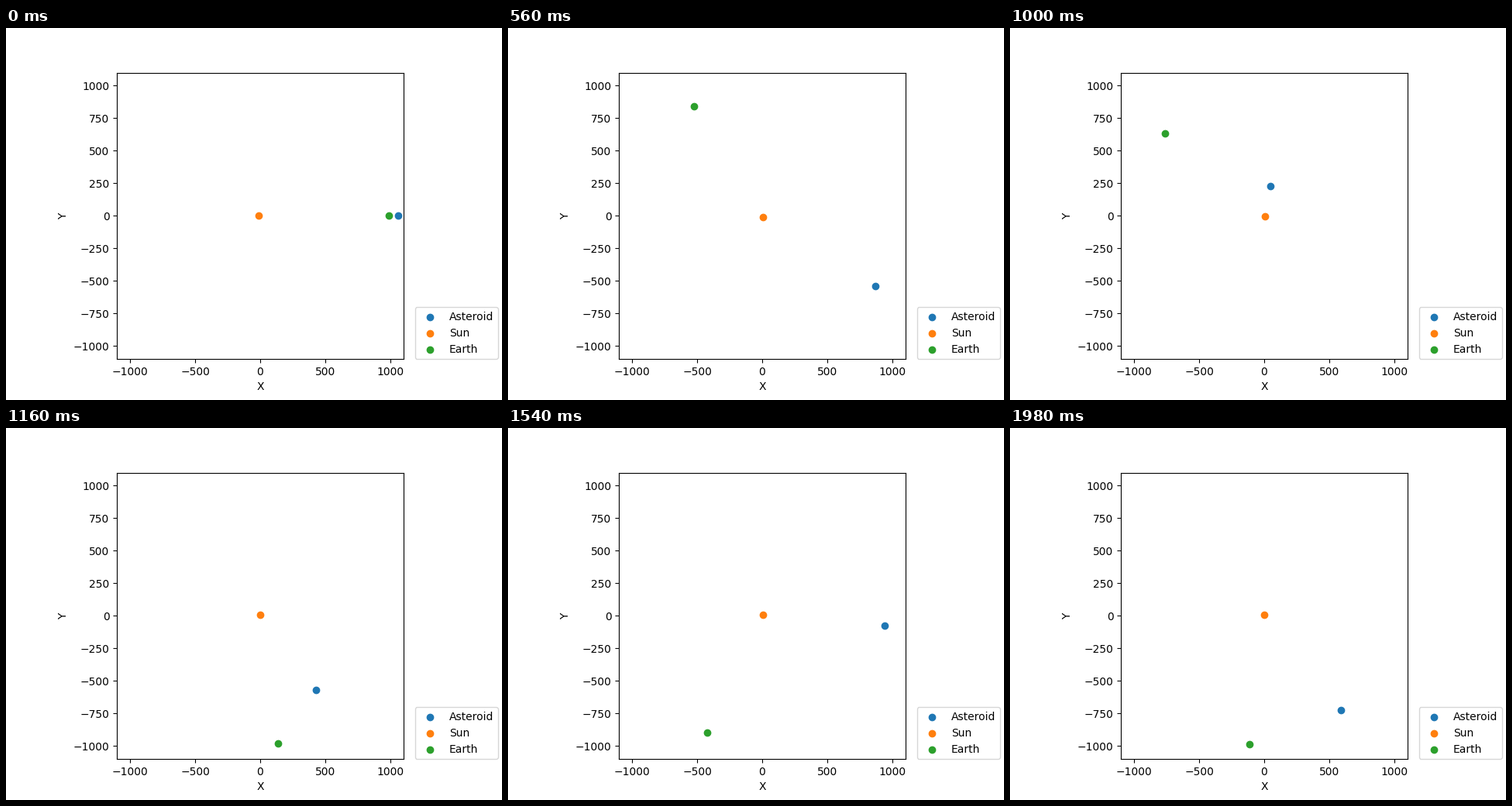
Write a matplotlib script that moves like this. It is 640 px wide and 480 px high and loops after 2 s.

```python
import math

import matplotlib.pyplot as plt
import numpy as np
from matplotlib.animation import FuncAnimation

FRAMES = 100
DT = 30 / 999 * 10      # model time per frame, the planet turns 1 rad per unit
MU = 0.01               # planet's share of the total mass
SCALE = 1000
START_STEPS, STEPS = 40, 6

# Waypoints of the asteroid: frame, x, y
WAYPOINTS = [(12, -.220, .199), (28, .899, -.557), (50, -.262, .121),
             (66, .899, -.504), (77, .821, .187), (99, .750, -.616)]
POS_TOL = 0.003

# Start values x, vx, vy and total GM, with their tolerances
GUESS = np.array([1.0, 0.0, 0.1, 0.1])
TOL = np.array([0.002, 0.01, 0.02, 0.004])


def cis(a):
    return complex(math.cos(a), math.sin(a))


# Fine time steps at first, while the asteroid leaves the planet
times = [DT * (i / START_STEPS) ** 2 for i in range(START_STEPS)]
times += [DT * (1 + i / STEPS) for i in range((FRAMES - 2) * STEPS + 1)]
legs = [(b - a, cis(a), cis((a + b) / 2), cis(b))
        for a, b in zip(times, times[1:])]


def step_of(frame):
    return START_STEPS + STEPS * (frame - 1) if frame else 0


def pull(z, e, gm):
    """Acceleration at z with the planet in direction e."""
    a = z + MU * e
    b = z - (1 - MU) * e
    return -gm * ((1 - MU) * a / abs(a) ** 3 + MU * b / abs(b) ** 3)


def orbit(q, last=FRAMES - 1):
    """Asteroid path by RK4 up to the given frame."""
    x, vx, vy, gm = (float(c) for c in GUESS + TOL * q)
    z, v = complex(x, 0), complex(vx, vy)
    path = [z]
    for h, e0, e1, e2 in legs[:step_of(last)]:
        a1 = pull(z, e0, gm)
        v2 = v + h / 2 * a1
        a2 = pull(z + h / 2 * v, e1, gm)
        v3 = v + h / 2 * a2
        a3 = pull(z + h / 2 * v2, e1, gm)
        v4 = v + h * a3
        a4 = pull(z + h * v3, e2, gm)
        z += h / 6 * (v + 2 * v2 + 2 * v3 + v4)
        v += h / 6 * (a1 + 2 * a2 + 2 * a3 + a4)
        path.append(z)
    return path


def misfit(q, points):
    path = orbit(q, points[-1][0])
    res = list(q)
    for frame, x, y in points:
        d = (path[step_of(frame)] - complex(x, y)) / POS_TOL
        res += [d.real, d.imag]
    return np.array(res)


def refine(q, points, rounds=8, eps=1e-4):
    """Gauss-Newton with step halving."""
    res = misfit(q, points)
    for _ in range(rounds):
        jac = np.array([(misfit(q + eps * u, points) - res) / eps
                        for u in np.eye(len(q))]).T
        step = np.linalg.lstsq(jac, -res, rcond=None)[0]
        for cut in (1, 0.5, 0.25, 0.1, 0.03):
            new = misfit(q + cut * step, points)
            if new @ new < res @ res:
                break
        else:
            break
        gain = res @ res - new @ new
        q, res = q + cut * step, new
        if gain < 1e-3:
            break
    return q


launch = np.zeros(4)
for count in range(1, len(WAYPOINTS) + 1):
    launch = refine(launch, WAYPOINTS[:count])
track = orbit(launch)

fig, ax = plt.subplots(figsize=(6.4, 4.8), dpi=100)
ax.set_aspect("equal")
ax.set_xlim(-1100, 1100)
ax.set_ylim(-1100, 1100)
ax.set_xticks(range(-1000, 1001, 500))
ax.set_yticks(range(-1000, 1001, 250))
ax.set_xlabel("X")
ax.set_ylabel("Y")
dots = [ax.scatter([0], [0], label=name)
        for name in ("Asteroid", "Sun", "Earth")]
ax.legend(loc="lower left", bbox_to_anchor=(1.04, 0), borderaxespad=0)


def update(frame):
    e = cis(DT * frame)
    for dot, z in zip(dots, (track[step_of(frame)], -MU * e, (1 - MU) * e)):
        dot.set_offsets([[SCALE * z.real, SCALE * z.imag]])
    return dots


anim = FuncAnimation(fig, update, frames=FRAMES, interval=20,
                     repeat=True, repeat_delay=0)
plt.show()
```
